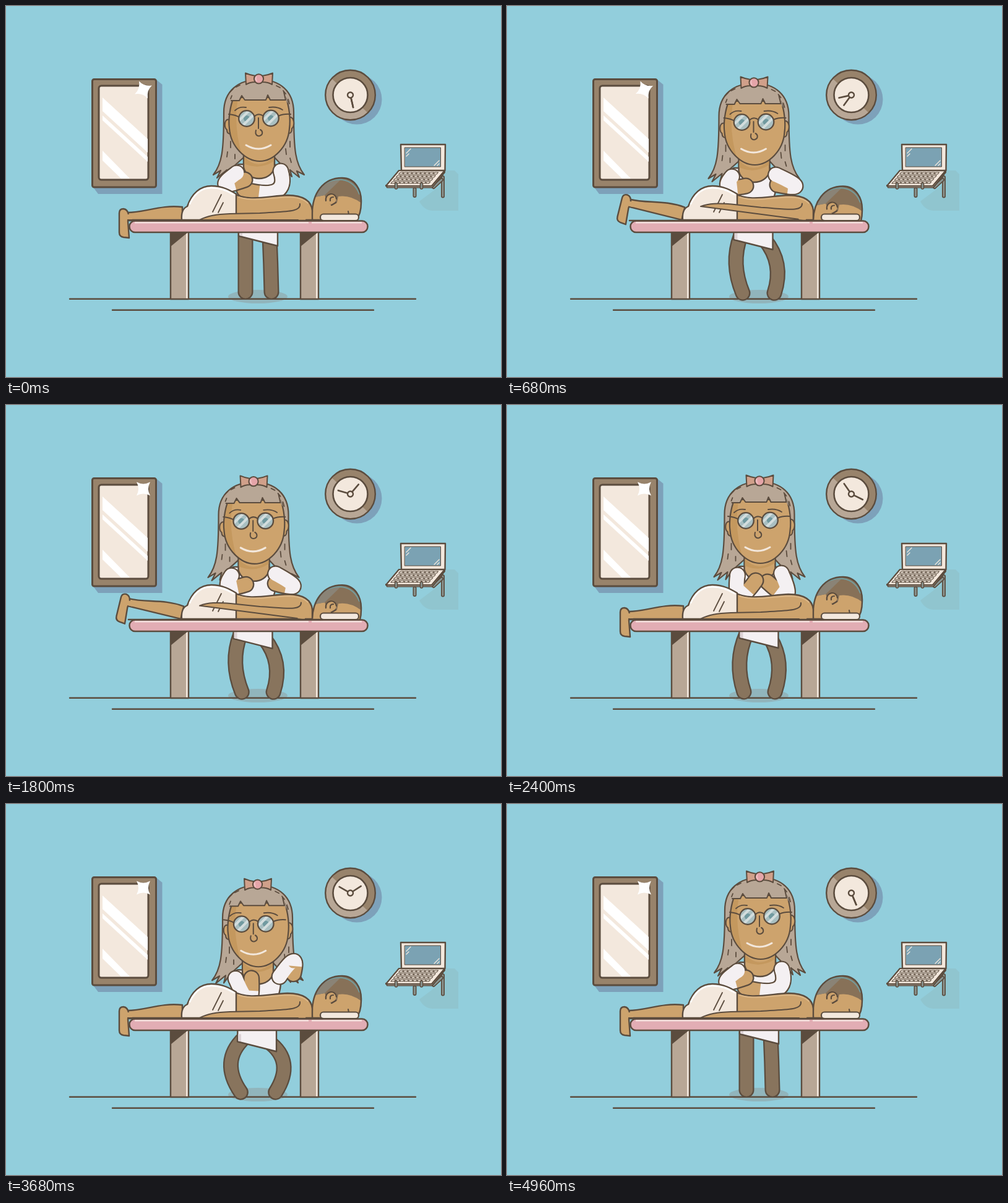
These frames come from a looping animation (800 px wide and 600 px high, 5000 ms). An HTML page with a canvas:

```html
<!DOCTYPE html>
<html lang="en">
<head>
<meta charset="utf-8">
<title>Massage room</title>
<style>
html, body { margin: 0; width: 100%; height: 100%; overflow: hidden; background: #92cedc; }
canvas { display: block; }
</style>
</head>
<body>
<canvas id="stage" width="800" height="600"></canvas>
<script>
const ctx = document.getElementById('stage').getContext('2d');
const LOOP = 5000;
const C = {
  wall: '#92cedc', ink: '#5b4c3e', skin: '#cda36d', skinDark: '#c4985e', skinLight: '#dcb787',
  hair: '#b8a796', cream: '#f3e8dd', white: '#f4f0f2', pink: '#e2adb4', trousers: '#88745d',
  frame: '#98836b', shadow: '#7da1ba', glass: '#7ba2b3', bow: '#d0a08a', knot: '#e5a5a9',
  patientHair: '#877158'
};

const lerp = (a, b, k) => a + (b - a) * k;
const clamp = k => Math.max(0, Math.min(1, k));
const smooth = k => k * k * (3 - 2 * k);
const ramp = (t, a, b) => smooth(clamp((t - a) / (b - a)));

function along(keys, t, ease) {
  let i = 0;
  while (i < keys.length - 2 && t >= keys[i + 1][0]) i++;
  const [t0, a] = keys[i], [t1, b] = keys[i + 1];
  const k = ease(clamp((t - t0) / (t1 - t0)));
  return Array.isArray(a) ? a.map((v, n) => lerp(v, b[n], k)) : lerp(a, b, k);
}

function shape(d, fill, stroke = C.ink, width = 2.4) {
  const p = d instanceof Path2D ? d : new Path2D(d);
  if (fill) { ctx.fillStyle = fill; ctx.fill(p); }
  if (stroke) { ctx.strokeStyle = stroke; ctx.lineWidth = width; ctx.stroke(p); }
}
function line(d, color = C.ink, width = 2) { shape(d, null, color, width); }
function disc(x, y, r, fill, stroke, width, ry = r) {
  const p = new Path2D();
  p.ellipse(x, y, r, ry, 0, 0, Math.PI * 2);
  shape(p, fill, stroke, width);
}
function box(x, y, w, h, r, fill, stroke, width) {
  const p = new Path2D();
  p.roundRect(x, y, w, h, r);
  shape(p, fill, stroke, width);
}
function group(draw, x = 0, y = 0, angle = 0, scale = 1, px = 0, py = 0) {
  ctx.save();
  ctx.translate(x + px, y + py);
  ctx.rotate(angle * Math.PI / 180);
  ctx.scale(scale, scale);
  ctx.translate(-px, -py);
  draw();
  ctx.restore();
}
function clipped(d, draw) {
  ctx.save();
  ctx.clip(new Path2D(d));
  draw();
  ctx.restore();
}

// Room

function floor() {
  disc(407, 470, 48, '#91b5bc', null, 0, 11);
  line('M103 473.7H662M172 491.7H594', C.ink, 2.4);
}

function mirror(t) {
  shape('M140 292L149 304H252.5V127L242 118.5Z', C.shadow, null);
  box(139.5, 118.5, 103, 174.5, 3, C.frame, C.ink, 3);
  box(150, 129, 80, 152, 4, C.cream, C.ink, 3);
  shape('M156 148L229 215V237L156 170ZM156 177L229 244V252L156 185ZM156 234L200 279H186L156 250Z', '#fff', null);
  const spin = along([[0, 18], [680, 110], [1200, 180], [LOOP, 180]], t, k => k);
  group(() => shape('M-11 -11Q0 -5 11 -11Q5 0 11 11Q0 5 -11 11Q-5 0 -11 -11Z', '#fff', null), 222, 135.5, spin);
}

function clock(t) {
  disc(0, 0, 40.3, C.hair, null);
  clipped('M-40 -36L40 40L60 0L40 -60H-40Z', () => disc(0, 0, 40, C.frame, null));
  disc(0, 0, 40.3, null, C.ink, 2.4);
  disc(0, 0, 28, C.cream, C.ink, 2.6);
  const fast = along([[0, 167], [680, 257], [1280, 335], [2400, 476], [3120, 564], [4960, 877], [LOOP, 887]], t, k => k);
  const slow = along([[0, 167], [680, 216], [1280, 253], [2400, 325], [3120, 373], [4960, 517], [LOOP, 527]], t, k => k);
  for (const a of [fast, slow]) group(() => line('M0 -5V-20.5', C.ink, 2.6), 0, 0, a);
  disc(0, 0, 4.5, C.cream, C.ink, 2.4);
}

function wallItems(t) {
  const size = t < 4340 ? lerp(1, 0.05, ramp(t, 3980, 4320)) : lerp(0.05, 1, ramp(t, 4340, 4860));
  group(() => mirror(t), 0, 0, 0, size, 191, 206);
  group(() => disc(0, 0, 40.5, C.shadow, null), 567, 151, 0, size);
  group(() => clock(t), 556.5, 144, 0, size);
}

function keyboard() {
  shape('M614 291L635 266H709L688 291Z', C.cream, C.ink, 2.2);
  for (let row = 0; row < 4; row++) {
    const y = 269 + row * 5, x = 637 - row * 4.2;
    for (let key = 0; key < 9; key++) {
      const kx = x + key * 7;
      shape(`M${kx} ${y}h5.5l-2.4 3h-5.5Z`, C.cream, C.ink, 1.1);
    }
  }
}

function laptop(t) {
  shape('M668 316Q676 331 690 331H731V272L725 266H711L705 288Z', '#90c5cf', null);
  const metal = '#8c9793';
  for (const d of ['M660.5 296V307', 'M706 277V307.5', 'M691 293L704 281']) {
    line(d, C.ink, 6);
    line(d, metal, 2.6);
  }
  const shut = t < 4300 ? ramp(t, 3960, 4260) : 1 - ramp(t, 4360, 4860);
  shape('M614 290H688L709 266V269L689 293.5H616Z', C.cream, C.ink, 2);
  keyboard();
  const x = lerp(638, 615, shut), y = lerp(224, 288, shut);
  const left = lerp(639, 633, shut), right = lerp(x + 72, 688, shut);
  const hinge = lerp(266, 265, shut);
  const lid = `M${x} ${y}H${right}L709.5 ${hinge}H${left}Z`;
  shape(lid, shut > 0.6 ? C.ink : C.cream, C.ink, 2.4);
  if (shut < 0.6) {
    ctx.save();
    ctx.translate(x, y);
    ctx.transform(1, 0, (638 - x) / 42, (hinge - y) / 42, 0, 0);
    box(6.5, 5, 58, 31, 0, C.glass, C.ink, 1);
    line('M9 14L16 7M9 19L13 15M54 34L62 26M59 34L62 31', C.cream, 1.3);
    ctx.restore();
  } else {
    line('M617 291H688L707 270', C.cream, 1.6);
  }
  for (const cx of [630.5, 671.5]) box(cx - 2, 286, 4, 10, 2, metal, C.ink, 1.5);
}

function table() {
  for (const x of [266, 476]) {
    shape(`M${x} 364h29v110h-29Z`, C.hair, null);
    shape(`M${x + 25} 366h3v107h-3Z`, C.cream, null);
    shape(`M${x} 366h28L${x} 389Z`, C.ink, null);
    line(`M${x} 366V474h29V366`, C.ink, 2.4);
  }
  box(199.5, 347.5, 385, 18.5, 9, C.pink, C.ink, 2.5);
  line('M209 350.4H488M495 350.4H574', '#f4e4e0', 2.4);
  line('M198 347H512', C.ink, 2.6);
}

// Patient

function patientHead() {
  const head = 'M495 346C492 300 515 278 543 278C564 278 575 297 574 318C574 332 571 340 566 346Z';
  shape(head, C.skin, null);
  clipped(head, () => {
    shape('M488 311L515 306L520 318L527 323L535 318L537 308Q557 305 576 320V270H488Z', C.patientHair, null);
    shape('M488 311L515 306L552 270H488Z', '#8a8376', null);
    line('M503 298C518 278 558 270 571 304', '#739b9c', 2);
  });
  shape(head, null);
  shape('M516 313C516 302 534 301 534 313L530 320Q518 323 516 313Z', C.skin, null);
  line('M517 315C515 302 533 300 534 312M524 315Q523 309 529 309M526 322L533 318', C.ink, 2.2);
  line('M553 332L554 337', C.ink, 2);
}

function patientLegs() {
  shape('M196 334C225 334 250 321 285 325V346H197Z', C.skin);
  shape('M183 335Q183 328 190 328Q197 329 198 338L197 348L199 375L190 374Q183 373 183 366Z', C.skin);
  shape('M194 337H204V345H194Z', C.skin, null);
}

function patient(kick) {
  ctx.save();
  ctx.beginPath();
  ctx.rect(0, 0, 800, 347);
  ctx.clip();
  group(patientHead, 0, 13.5 * kick);
  ctx.restore();
  group(patientLegs, 0, 0, 14 * kick, 1, 284, 335);
  shape('M368 303C390 317 425 307 455 306C481 306 494 316 495 331V346H368Z', C.skin);
  line('M376 309C400 317 428 310 455 309C472 309 482 313 488 319', C.skinLight, 2);
  shape('M284 346C283 335 286 327 293 324C300 303 314 291 332 291C350 291 362 298 372 304V346Z', C.cream);
  line('M297 320C305 303 316 294 332 294C346 294 358 299 368 305', '#fff', 2.6);
  line('M348 305L334 333M351 318L343 334', C.ink, 1.8);
  group(() => {
    shape('M313 346C326 339 340 337 362 336L410 335C450 334 468 333 476 326L487 334L484 346Z', C.skin, null);
    line('M475 320C477 334 450 332 410 335L362 336C340 337 326 339 313 346H472', C.ink, 2);
  }, 0, 0, 7.5 * kick, 1, 480, 335);
  box(508, 336.5, 62, 10.5, 5, C.cream, C.ink, 2.2);
}

// Therapist. Pose: body x, y, face turn, knee and foot x per leg, elbow and hand per arm.

const rest   = [0, 0, 0, 387, 387, 428, 429, 355, 288, 386, 281, 437, 299, 385, 297];
const strike = [-9.5, 6, 0, 361, 381, 448, 432, 358, 292, 386, 291, 466, 291, 437, 289];
const lift   = [-10, 6, 0, 361, 381, 448, 432, 386, 318, 391, 275, 467, 291, 437, 290];
const gather = [-0.5, 5, -2.5, 367, 383, 449, 433, 376, 308, 402, 284, 452, 306, 421, 286];
const raise  = [-2.5, 13.5, -7, 342, 379, 470, 436, 393, 318, 397, 277, 462, 231, 478, 264];
const drop   = [-1, 10, -5, 350, 380, 463, 435, 390, 312, 396, 290, 468, 296, 441, 294];
const press  = [5.5, 3, 0, 394, 393, 428, 426, 370, 306, 415, 302, 484, 284, 450, 301];
const poses = [
  [0, rest], [160, rest], [440, lift], [680, strike], [960, lift], [1120, strike], [1280, lift],
  [1700, strike], [2180, gather], [2640, gather], [2840, raise], [3140, raise], [3320, drop],
  [3600, raise], [3800, drop], [4200, press], [4440, press], [4880, rest], [LOOP, rest]
];

function leg(hipX, hipY, kneeX, footX, footY) {
  const d = `M${hipX} ${hipY}Q${kneeX} 416 ${footX} ${footY}`;
  line(d, C.ink, 25);
  line(d, C.trousers, 20.4);
}

function torso() {
  shape('M376 256Q366 261 370 275L377 310L376 372L439 388V310Q447 285 447 266L434 256Z', C.white);
  shape('M377 360H382V372L377 371Z', '#ddd3d6', null);
  shape('M384 240V261C390 285 428 285 434 261V240Z', C.skin);
  shape('M385 244Q408 268 433 244V251Q410 266 385 255Z', C.skinDark, null);
}

// A bendy sleeve that passes through the elbow and ends in a bare hand.
function arm(sx, sy, ex, ey, hx, hy) {
  const cuff = 0.82;
  const bx = 2 * ex - (sx + hx) / 2, by = 2 * ey - (sy + hy) / 2;
  const ax = lerp(sx, bx, cuff), ay = lerp(sy, by, cuff);
  const cx = lerp(ax, lerp(bx, hx, cuff), cuff), cy = lerp(ay, lerp(by, hy, cuff), cuff);
  const whole = `M${sx} ${sy}Q${bx} ${by} ${hx} ${hy}`;
  line(whole, C.ink, 27);
  line(whole, C.skin, 22.4);
  disc(sx, sy, 11.2, C.white, null);
  ctx.lineCap = 'butt';
  line(`M${sx} ${sy}Q${ax} ${ay} ${cx} ${cy}`, C.white, 22.4);
  ctx.lineCap = 'round';
}

function backHair() {
  shape('M335 273C349 255 352 235 352 172C352 137 376 119 409 119C443 119 465 138 465 172' +
    'C465 235 468 255 482 273L470 267L474 277L459 265L462 276L450 262L434 245H384' +
    'L365 262L354 277L357 265L341 278L347 266Z', C.hair, C.ink, 2.2);
  line('M363 219V229M370 240V247M358 236L357 244M452 231L453 240M459 219V228M459 246L461 253', C.ink, 1.8);
}

function lens(x, y) {
  disc(x, y, 12.8, '#a9bfc1', null);
  const p = new Path2D();
  p.arc(x, y, 12, 0, Math.PI * 2);
  ctx.save();
  ctx.clip(p);
  disc(x, y, 5, '#719aa0', null);
  line(`M${x - 14} ${y + 5}L${x + 5} ${y - 14}M${x - 7} ${y + 12}L${x + 12} ${y - 7}`, '#d3dddd', 4);
  ctx.restore();
  disc(x, y, 12.8, null, C.ink, 2.3);
}

function features() {
  line('M370 169Q377 162 388 164M425 164Q438 162 447 168', C.ink, 1.8);
  line('M360 175Q371 176 377 180M440 178Q449 174 460 175M401 179Q408 172 416 178', C.ink, 2);
  lens(389, 182);
  lens(428, 181.5);
  line('M408 181V198M404 201C402 208 406 211 410 210C416 208 415 202 411 200', C.ink, 2);
  line('M388 225Q408 237 428 225', C.cream, 3);
}

function head(turn) {
  shape('M362 184C352 180 352 198 357 200C357 206 361 208 365 206Z', C.skin, C.ink, 2);
  shape('M457 180C467 178 467 195 462 198C462 206 458 207 454 205Z', C.skin, C.ink, 2);
  const face = 'M368 148C362 162 359 184 361 198C363 228 388 251 410 251C432 251 456 228 458 198C460 184 458 162 452 148Z';
  shape(face, C.skin, null);
  clipped(face, () => shape('M355 145H376Q366 190 382 244L355 250Z', C.skinDark, null));
  shape(face, null, C.ink, 2.2);
  shape('M361 158C363 137 382 122 409 122C438 122 453 136 455 158L452 152H428L424 144L420 152H386L381 145L377 153H364Z', C.hair, null);
  line('M364 153H377L381 145L386 152H420L423 144L427 152H452L449 139', C.ink, 2);
  line('M362 139L367 134M372 131L378 128M437 129L443 132M448 137L452 142M456 151L458 158M365 145L363 150', C.ink, 1.8);
  group(features, turn, 0);
  shape('M387 108.5Q395 112 403 113V123Q394 123 388 127ZM431 108.5Q423 112 414 113V123Q424 123 430 127Z', C.bow, C.ink, 2);
  disc(408.5, 117.8, 7.6, C.knot, C.ink, 2);
  line('M404 115Q403 118 405 121', '#f0c3c5', 2);
}

function therapist(t) {
  const [ox, oy, turn, kneeL, footL, kneeR, footR, ...arms] = along(poses, t, smooth);
  const footY = 462.5 + oy * 0.3;
  group(backHair, ox, oy);
  leg(387 + ox, 366 + oy, kneeL, footL, footY);
  leg(426 + ox, 372 + oy, kneeR, footR, footY);
  group(torso, ox, oy);
  group(() => head(turn), ox, oy);
  arm(444 + ox, 267 + oy, ...arms.slice(4));
  arm(373 + ox, 270 + oy, ...arms.slice(0, 4));
}

const kickAt = (t, peak) => ramp(t, peak - 140, peak - 20) * (1 - ramp(t, peak + 60, peak + 300));

function draw(t) {
  ctx.fillStyle = C.wall;
  ctx.fillRect(0, 0, 800, 600);
  ctx.lineCap = ctx.lineJoin = 'round';
  wallItems(t);
  laptop(t);
  floor();
  therapist(t);
  patient(Math.max(...[680, 1720, 3380].map(peak => kickAt(t, peak))));
  table();
}

const start = performance.now();
function tick() {
  draw((performance.now() - start) % LOOP);
  requestAnimationFrame(tick);
}
tick();
</script>
</body>
</html>
```
